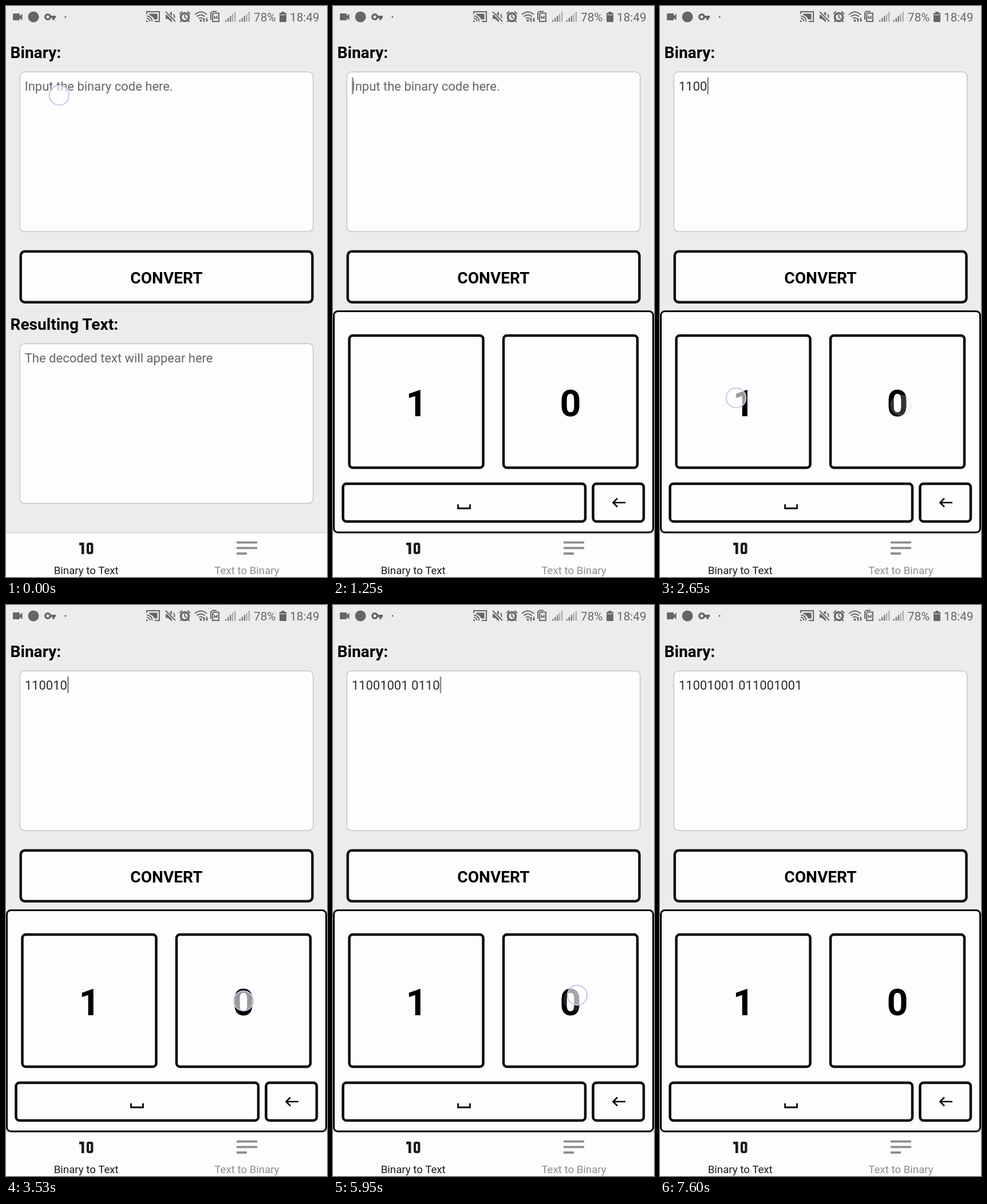
Recreate the animation shown at these times as an HTML page. Size 561 by 998 pixels, loop 8 s.

```html
<!DOCTYPE html>
<html lang="en">
<head>
<meta charset="utf-8">
<title>Binary converter</title>
<style>
  html, body { margin: 0; width: 100%; height: 100%; overflow: hidden; background: #ececec; }
  svg { display: block; width: 100vw; height: 100vh; font-family: Roboto, "Open Sans", sans-serif; }
  .bold { font-weight: 700; font-size: 28.1px; }
  .body { font-size: 22px; }
  .hint { fill: #666; }
  .tab { font-size: 18.7px; text-anchor: middle; }
  .status { font-size: 20.7px; fill: #666; }
  .digit { font-weight: 700; font-size: 64.5px; text-anchor: middle; }
  .mid { text-anchor: middle; }
  .field { fill: #fdfdfd; stroke: #c6c6c6; stroke-width: 1.5; }
  .key { fill: #fdfdfd; stroke: #0a0a0a; stroke-width: 4.5; }
  .line { fill: none; stroke: #666; stroke-width: 2; }
</style>
</head>
<body>
<svg viewBox="0 0 561 998" preserveAspectRatio="none">
  <rect width="561" height="998" fill="#ececec"/>

  <g fill="#666">
    <path d="M13 13h10q1 0 1 1v3.5l4.5-4v11.500l-4.500-4V24q0 1-1 1H13q-1 0-1-1V14q0-1 1-1z"/>
    <circle cx="48" cy="19" r="9.500"/>
    <circle cx="73" cy="19" r="4.300" class="line" stroke-width="3.500" style="stroke-width:3.500"/>
    <path d="M77 17h10v4h-2v3.500h-4V21h-4z"/>
    <circle cx="104" cy="19" r="1.600"/>
    <path class="line" d="M246 14V10h22v17h-8M246 17.500a9.500 9.500 0 0 1 9.500 9.500M246 21.500a5.500 5.500 0 0 1 5.500 5.500"/>
    <path d="M245 25a3 3 0 0 1 3 3h-3zM250 13.500h14.500v10h-5.500q-2.500-6-9-8z"/>
    <path d="M279 15.500h4l7-6v19l-7-6h-4z"/>
    <path d="M279 10l17 17" stroke="#ececec" stroke-width="5"/>
    <path class="line" d="M279 10l17 17M293 14q2 3 1.500 7"/>
    <circle cx="312.500" cy="19.500" r="7" class="line" style="stroke-width:3.500"/>
    <path class="line" d="M312.500 15v5l3.500 2M303 14l5-4.500M322 14l-5-4.500M307 25l-2.500 3M318 25l2.500 3"/>
    <path class="line" d="M330 15q10.500-9 21 0M333.500 18.500q7-6 14 0M337 22q3.500-3 7 0"/>
    <circle cx="340.500" cy="25.500" r="2"/>
    <path d="M343.500 24l2.500-3.500 2.500 3.500h-1.500v4h-2v-4zM348.500 24.500h1.500v-4h2v4h1.500l-2.500 3.500z"/>
    <path class="line" d="M358 24V12l3-2.500h7"/>
    <path class="line" d="M361 14.500l2-2h9V27h-11z"/>
    <path class="line" d="M364 23v-5l2.500 3 2.500-3v5" style="stroke-width:1.500"/>
    <g id="bars"></g>
    <path d="M481.500 10h5v2h2.500q1 0 1 1v14q0 1-1 1h-10q-1 0-1-1V13q0-1 1-1h2.500z"/>
  </g>
  <path d="M479 15.500h10" stroke="#ececec" stroke-width="1"/>
  <text class="status" x="433" y="26.500">78%</text>
  <text class="status" x="496" y="26.500">18:49</text>

  <text class="bold" x="7.500" y="91">Binary:</text>
  <rect class="field" x="24.200" y="115.200" width="512.600" height="279" rx="8"/>
  <text class="body hint" id="hint" x="32.700" y="147.500">Input the binary code here.</text>
  <text class="body" id="typed" x="32.700" y="147.500" fill="#2c2c2c"></text>
  <rect id="caret" y="125" width="2.600" height="29" fill="#8a8a8a"/>

  <rect class="key" x="25.700" y="429" width="509.800" height="88.700" rx="7" style="stroke:#111"/>
  <text class="bold mid" x="280.500" y="485">CONVERT</text>

  <text class="bold" x="7.500" y="566">Resulting Text:</text>
  <rect class="field" x="24.200" y="590.200" width="512.600" height="279" rx="8"/>
  <text class="body hint" x="32.700" y="622.500">The decoded text will appear here</text>

  <rect y="920" width="561" height="2" fill="#dedede"/>
  <rect y="922" width="561" height="76" fill="#fdfdfd"/>
  <path d="M128 938h8.500v20h-4.600v-15.500H128z" fill="#1c1c1c"/>
  <rect x="143" y="940" width="7.300" height="16" rx="2" fill="none" stroke="#1c1c1c" stroke-width="4.200"/>
  <text class="tab" x="140.200" y="993" fill="#1c1c1c">Binary to Text</text>
  <path d="M403 937.700h36M403 947.400h36M403 957h18" stroke="#8e8e8e" stroke-width="3.800"/>
  <text class="tab" x="421" y="993" fill="#8e8e8e">Text to Binary</text>

  <g id="keyboard">
    <rect x="1.500" y="533.500" width="558" height="386.500" rx="7" fill="#fdfdfd" stroke="#0a0a0a" stroke-width="3"/>
    <rect class="key" x="28.500" y="576" width="234" height="231" rx="6"/>
    <rect class="key" x="298" y="576" width="234" height="231" rx="6"/>
    <rect class="key" x="17.500" y="835" width="423.500" height="66" rx="6"/>
    <rect class="key" x="454.500" y="835" width="88.500" height="66" rx="6"/>
    <text class="digit" x="146" y="716.500">1</text>
    <text class="digit" x="415" y="716.500">0</text>
    <path d="M218.500 871v7h21v-7" fill="none" stroke="#0a0a0a" stroke-width="2.800"/>
    <path d="M511 868h-21M497 860.500l-7.500 7.500 7.500 7.500" fill="none" stroke="#0a0a0a" stroke-width="2.600"/>
  </g>
  <g id="touches"></g>
</svg>
<script>
const LOOP = 8000, FOCUS = 200, FADE = 150, BLINK = 530;
const DIGIT_W = 12.35, SPACE_W = 5.45;

// press time, release time, x, y, typed character
const taps = [
  [-1, 130, 93, 156, ''],
  [1505, 1560, 130, 690, '1'],
  [2035, 2110, 131, 688, '1'],
  [2240, 2320, 415, 695, '0'],
  [2430, 2550, 421, 698, '0'],
  [2600, 2780, 133, 685, '1'],
  [3125, 3255, 414, 692, '0'],
  [3450, 3650, 415, 692, '0'],
  [3725, 3855, 135, 690, '1'],
  [4655, 4840, 262, 861, ' '],
  [4980, 5135, 385, 706, '0'],
  [5270, 5390, 118, 688, '1'],
  [5480, 5600, 121, 688, '1'],
  [5720, 5830, 421, 690, '0'],
  [5935, 6080, 427, 682, '0'],
  [6200, 6330, 129, 691, '1'],
  [6460, 6590, 421, 690, '0'],
  [6680, 6790, 428, 695, '0'],
  [6870, 6990, 132, 690, '1'],
].map(([press, release, x, y, char]) => ({ press, release, x, y, char }));

const $ = id => document.getElementById(id);
const show = (el, on) => el.setAttribute('visibility', on ? 'visible' : 'hidden');

function add(parent, tag, attrs) {
  const el = document.createElementNS('http://www.w3.org/2000/svg', tag);
  for (const name in attrs) el.setAttribute(name, attrs[name]);
  return parent.appendChild(el);
}

for (const left of [383, 407.5]) {
  for (let i = 0; i < 5; i++) {
    const height = 3 + i * 3.6;
    add($('bars'), 'rect', {
      x: left + i * 4.1, y: 27.5 - height, width: i < 3 ? 2.4 : 1.8, height,
      opacity: i < 3 ? 0.85 : 0.6,
    });
  }
}

for (const tap of taps) {
  tap.el = add($('touches'), 'circle', {
    cx: tap.x, cy: tap.y, r: 17.2,
    fill: '#fff', 'fill-opacity': 0.6, stroke: '#c3c8e8', 'stroke-width': 2,
  });
}

function draw(t) {
  let text = '', blinkStart = FOCUS - 10;
  for (const tap of taps) {
    const alpha = t < tap.press ? 0 : Math.min(1, 1 - (t - tap.release) / FADE);
    tap.el.setAttribute('opacity', Math.max(0, alpha));
    if (tap.char && t >= tap.release) {
      text += tap.char;
      blinkStart = tap.release + 70;
    }
  }
  const width = [...text].reduce((sum, c) => sum + (c === ' ' ? SPACE_W : DIGIT_W), 0);
  const lit = t < blinkStart || (t - blinkStart) % (2 * BLINK) < BLINK;

  $('typed').textContent = text;
  $('caret').setAttribute('x', 33 + width);
  show($('hint'), !text);
  show($('caret'), t >= FOCUS && lit);
  show($('keyboard'), t >= FOCUS);
}

const start = performance.now();
function tick() {
  draw((performance.now() - start) % LOOP);
  requestAnimationFrame(tick);
}
tick();
</script>
</body>
</html>
```
